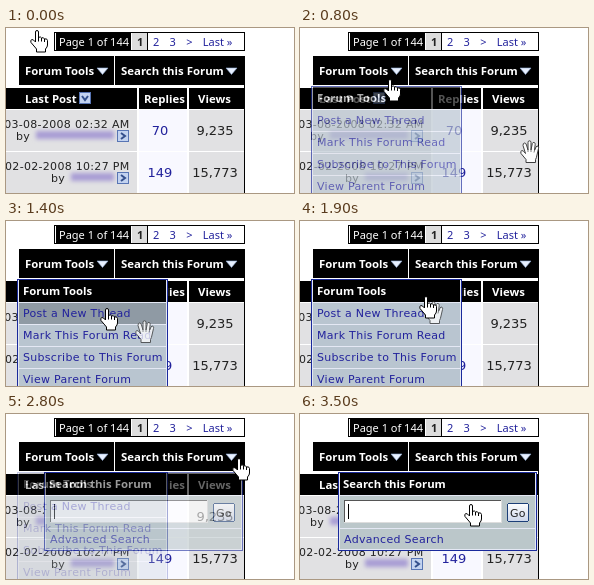
An HTML page for the animation above (4500 ms loop, 288 by 165 pixels).

```html
<!DOCTYPE html>
<html lang="en">
<head>
<meta charset="utf-8">
<title>Forum menus</title>
<style>
html, body { margin: 0; width: 100%; height: 100%; overflow: hidden; background: #fff; }
svg { display: block; width: 100vw; height: 100vh; }
rect { shape-rendering: crispEdges; }
text { font: 11px "DejaVu Sans", sans-serif; letter-spacing: .3px; fill: #222; white-space: pre; }
.bold { font: bold 11.4px "Noto Sans", sans-serif; letter-spacing: 0; fill: #fff; }
.page { font: 11px "Noto Sans", sans-serif; letter-spacing: 0; }
.num { font-size: 13px; letter-spacing: 0; text-anchor: middle; }
.link { fill: #22229c; }
.white { fill: #fff; }
.strong { font-weight: bold; }
.end { text-anchor: end; }
</style>
</head>
<body>
<svg viewBox="0 0 288 165">
  <defs>
    <filter id="blur" x="-20%" y="-80%" width="140%" height="260%"><feGaussianBlur stdDeviation="2"/></filter>
    <linearGradient id="button" x2="0" y2="1"><stop stop-color="#fff"/><stop offset="1" stop-color="#ccd6ea"/></linearGradient>
    <clipPath id="searchArea"><rect x="38" y="58" width="199" height="79"/></clipPath>
  </defs>
  <g id="table"></g>
  <g id="tools"><g id="toolsBody"></g></g>
  <g id="under" clip-path="url(#searchArea)"><use href="#toolsBody"/></g>
  <g id="search"></g>
  <g id="grab" fill="#fff" stroke="#333" stroke-linejoin="round">
    <path d="M6 22.5V19.5L1 13.5Q0 11 2 10.5Q3.5 10.5 5.5 13.5L3 5.5Q3 3 4.5 3Q6 3 6.5 5L8 10V2.5Q8 .8 9.5 .8Q11 .8 11 2.5V10L12.3 3.5Q13 2 14.2 2.5Q15.5 3 15.2 4.5L14.5 10.5L16 7Q17 5.5 18 6.2Q19 7 18.5 8.5L17 15Q16.5 18 15.5 19.5V22.5Z"/>
    <path d="M8 10v2M11 10v2M14.5 10.5l-.5 2" fill="none" stroke="#777"/>
  </g>
  <g id="pointer" fill="#fff" stroke="#000" stroke-linejoin="round">
    <path d="M6.5 22V19L1 12.5Q0 10 2 9.5Q3.5 9.500 5.5 12V2Q5.5 .5 7 .5Q8.5 .5 8.5 2V7.5Q10.500 6 11.5 8Q13.500 6.800 14.5 9Q17 8 17.500 10.5V15Q17.500 17 15.5 19V22Z"/>
    <path d="M8.5 7v4.500M11.5 8v3.500M14.5 9v3" fill="none"/>
  </g>
</svg>
<script>
const $ = id => document.getElementById(id);
const rect = (x, y, x2, y2, fill, more = "") =>
  `<rect x="${x}" y="${y}" width="${x2 - x}" height="${y2 - y}" fill="${fill}" ${more}/>`;
const text = (x, y, s, cls = "") => `<text x="${x}" y="${y}" class="${cls}">${s}</text>`;
const arrow = x => `<path d="M${x} 40h11l-5.5 6.500z" fill="#e8f0ff" stroke="#8fa8d0" stroke-width=".6"/>`;
const icon = (x, y, turn) =>
  `<g transform="translate(${x} ${y})">` + rect(0, 0, 12, 12, "#5875b4") + rect(1, 1, 11, 11, "#c3d3f0") +
  `<path d="M4 3l4 3-4 3" transform="rotate(${turn} 6 6)" fill="none" stroke="#34508c" stroke-width="2"/></g>`;
const columns = (y, y2, fills) =>
  rect(0, y, 131, y2, fills[0]) + rect(133, y, 181, y2, fills[1]) + rect(183, y, 238, y2, fills[2]);

function post(y, date, replies, views, nameX) {
  return columns(y, y + 41, ["#e1e1e3", "#f8f8ff", "#e1e1e3"]) +
    text(123.5, y + 18, date, "end") + text(nameX - 20, y + 30, "by") +
    rect(nameX, y + 21, 108, y + 29, "#a89cd4", 'filter="url(#blur)"') + icon(111, y + 20, 0) +
    text(154, y + 25, replies, "num link") + text(209, y + 25, views, "num");
}

// Menu frame with its black title bar.
const menu = (x, y2, x2, title, titleX) =>
  rect(x, 58, x2, y2, "#1a2a9c") + rect(x + 1, 59, x2 - 1, y2 - 1, "#e4e8f4") +
  rect(x + 2, 59, x2 - 2, 81, "#000") + text(titleX, 74, title, "bold");

$("table").innerHTML =
  rect(48, 4, 239, 23, "#000") + rect(49, 5, 238, 22, "#fff") + rect(50, 5, 125, 22, "#000") +
  rect(126, 5, 141, 22, "#ddd") + rect(141, 5, 142, 22, "#000") +
  text(53, 18, "Page 1 of 144", "page white") + text(131, 18, "1", "page strong") +
  ["2", "3", "&gt;", "Last »"].map((s, i) => text(147 + 16.6 * i, 18, s, "page link")).join("") +
  rect(13, 28, 108, 57, "#000") + rect(109, 28, 239, 57, "#000") + rect(238, 57, 239, 165, "#000") +
  text(19, 47, "Forum Tools", "bold") + arrow(91) +
  text(115, 47, "Search this Forum", "bold") + arrow(220) +
  columns(60, 81, ["#000", "#000", "#000"]) +
  text(19, 75, "Last Post", "bold") + icon(73, 64, 90) +
  text(138, 75, "Replies", "bold") + text(192, 75, "Views", "bold") +
  post(82, "03-08-2008 02:32 AM", "70", "9,235", 30) +
  post(124, "02-02-2008 10:27 PM", "149", "15,773", 65);

const ROW = "#b9c5d0", HOVER = "#8f9aa4";
const items = ["Post a New Thread", "Mark This Forum Read", "Subscribe to This Forum", "View Parent Forum"];
$("toolsBody").innerHTML = menu(11, 170, 162, "Forum Tools", 17) +
  items.map((s, i) => rect(13, 82 + 22 * i, 160, 103 + 22 * i, ROW, i ? "" : 'id="first"') +
    text(17, 96 + 22 * i, s, "link")).join("");

$("search").innerHTML = menu(38, 137, 237, "Search this Forum", 43) +
  rect(40, 82, 235, 114, "#bbc7ca") + rect(40, 115, 235, 135, "#bbc7ca") +
  rect(44, 86, 202, 109, "#ddd") + rect(44, 86, 201, 108, "#555") + rect(45, 87, 201, 108, "#fff") +
  rect(48, 90, 49, 105, "#000") +
  `<rect x="207.5" y="89.5" width="21" height="18" rx="2" fill="url(#button)" stroke="#1c3f78"/>` +
  text(210, 103, "Go") + text(44, 129, "Advanced Search", "link");

// Progress from 0 to 1 between two moments.
const ramp = (t, from, to) => Math.min(1, Math.max(0, (t - from) / (to - from)));

// Follows [ms, x, y] key points in straight lines.
function follow(path, t) {
  const i = Math.max(1, path.findIndex(p => p[0] > t));
  const last = path[path.length - 1];
  if (t >= last[0]) return last.slice(1);
  const [a, b] = [path[i - 1], path[i]], k = ramp(t, a[0], b[0]);
  return [a[1] + (b[1] - a[1]) * k, a[2] + (b[2] - a[2]) * k];
}
const pointerPath = [[0, 24, 2], [500, 71, 30], [1000, 91, 65], [1400, 94, 87], [1700, 94, 87],
  [2300, 168, 52], [2800, 226, 44], [2900, 226, 44], [3400, 164, 90]];
const grabPath = [[300, 284, 146], [1000, 195, 99], [1400, 129, 99], [1700, 99, 92]];

const place = (id, [x, y]) =>
  $(id).setAttribute("transform", `translate(${Math.round(x)} ${Math.round(y)})`);
const fade = (id, alpha) => $(id).setAttribute("opacity", alpha);

function draw(ms) {
  const t = Math.floor(ms % 4500 / 100) * 100;
  const pointer = follow(pointerPath, t);
  place("pointer", pointer);
  // The open hand catches up with the pointer and then trails it.
  place("grab", t < 1700 ? follow(grabPath, t) : pointer.map(v => v + 5));
  fade("grab", t >= 300 && t < 2500 ? 1 - .25 * ramp(t, 600, 1400) : 0);
  fade("tools", ramp(t, 600, 900) * (1 - ramp(t, 2500, 2900)));
  fade("under", t >= 2500 && t < 3100 ? 1 : 0);
  fade("search", ramp(t, 2500, 3000));
  $("first").setAttribute("fill", t >= 1200 && t < 1900 ? HOVER : ROW);
}

const start = performance.now();
function loop() {
  draw(performance.now() - start);
  requestAnimationFrame(loop);
}
loop();
</script>
</body>
</html>
```
